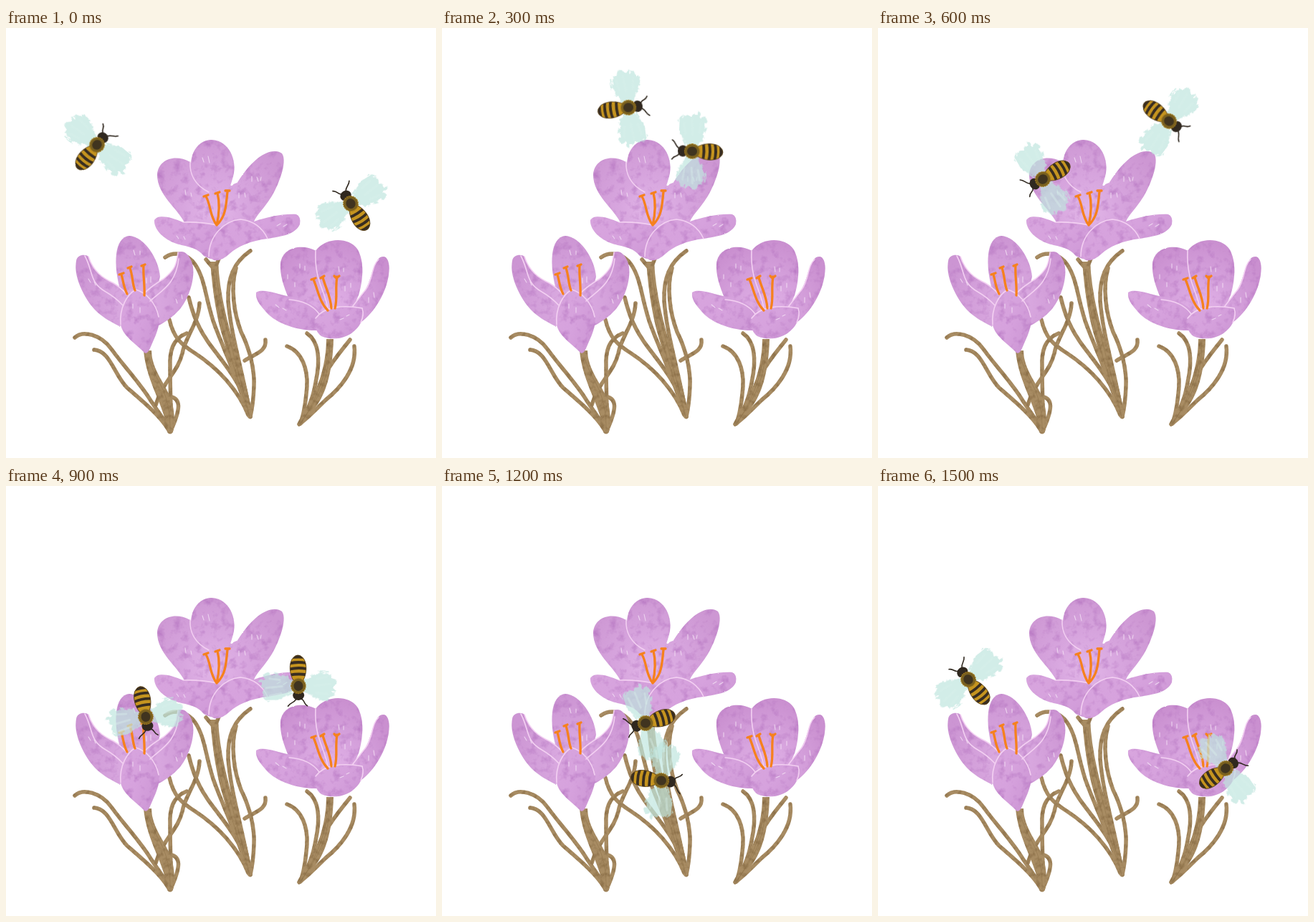
Recreate the animation shown at these times as an HTML page. Size 600 px wide and 600 px high, loop 1800 ms.

```html
<!DOCTYPE html>
<html lang="en">
<head>
<meta charset="utf-8">
<title>Bees over crocuses</title>
<style>
  html, body { margin: 0; width: 100%; height: 100%; overflow: hidden; background: #fff; }
  svg { display: block; width: 100vw; height: 100vh; }
  .leaves path { fill: none; stroke: #a88c63; stroke-width: 5.5; stroke-linecap: round; }
  .leaves .stem { fill: #a88c63; stroke: none; }
  .leaves .thin { stroke: #8c7147; stroke-width: 1; opacity: .5; }
  .veins { fill: none; stroke: #f3d0f2; stroke-width: 1.6; stroke-linecap: round; }
  .ticks { fill: none; stroke: #f2dff4; stroke-width: 1.1; stroke-linecap: round; opacity: .85; }
  .stamens { fill: none; stroke: #f6811d; stroke-width: 3.3; stroke-linecap: round; stroke-linejoin: round; }
</style>
</head>
<body>
<svg viewBox="0 0 600 600" xmlns="http://www.w3.org/2000/svg">
  <defs>
    <filter id="petalPaint" x="-5%" y="-5%" width="110%" height="110%" color-interpolation-filters="sRGB">
      <feTurbulence type="fractalNoise" baseFrequency=".09" numOctaves="4" seed="4" result="noise"/>
      <feColorMatrix in="noise" values="0 0 0 0 .69  0 0 0 0 .43  0 0 0 0 .74  1.5 0 0 0 -.75" result="spots"/>
      <feDisplacementMap in="SourceGraphic" in2="noise" scale="1.5" xChannelSelector="R" yChannelSelector="G" result="shape"/>
      <feComposite in="spots" in2="shape" operator="in" result="clipped"/>
      <feMerge><feMergeNode in="shape"/><feMergeNode in="clipped"/></feMerge>
    </filter>
    <filter id="leafPaint" x="-5%" y="-5%" width="110%" height="110%" color-interpolation-filters="sRGB">
      <feTurbulence type="fractalNoise" baseFrequency=".15" numOctaves="3" seed="9" result="noise"/>
      <feColorMatrix in="noise" values="0 0 0 0 .48  0 0 0 0 .37  0 0 0 0 .22  1.4 0 0 0 -.6" result="spots"/>
      <feDisplacementMap in="SourceGraphic" in2="noise" scale="1.2" xChannelSelector="R" yChannelSelector="G" result="shape"/>
      <feComposite in="spots" in2="shape" operator="in" result="clipped"/>
      <feMerge><feMergeNode in="shape"/><feMergeNode in="clipped"/></feMerge>
    </filter>
    <filter id="brush" x="-20%" y="-20%" width="140%" height="140%" color-interpolation-filters="sRGB">
      <feTurbulence type="fractalNoise" baseFrequency=".1 .22" numOctaves="3" seed="2"/>
      <feDisplacementMap in="SourceGraphic" scale="12" xChannelSelector="R" yChannelSelector="G"/>
    </filter>
    <radialGradient id="backA" gradientUnits="userSpaceOnUse" cx="292" cy="255" r="105">
      <stop offset="0" stop-color="#e2b6e8"/><stop offset=".45" stop-color="#d7a5de"/><stop offset="1" stop-color="#cd97d3"/>
    </radialGradient>
    <radialGradient id="backB" gradientUnits="userSpaceOnUse" cx="184" cy="385" r="95">
      <stop offset="0" stop-color="#deb0e4"/><stop offset=".5" stop-color="#d4a1db"/><stop offset="1" stop-color="#cc95d3"/>
    </radialGradient>
    <radialGradient id="backC" gradientUnits="userSpaceOnUse" cx="452" cy="390" r="92">
      <stop offset="0" stop-color="#e2b3e8"/><stop offset=".5" stop-color="#d5a1dc"/><stop offset="1" stop-color="#ca90d0"/>
    </radialGradient>
    <linearGradient id="front" x1="0" y1="0" x2="1" y2=".6">
      <stop offset="0" stop-color="#d8a5de"/><stop offset=".55" stop-color="#d6a2dd"/><stop offset="1" stop-color="#ce98d6"/>
    </linearGradient>

    <path id="wing" d="M5,-7 L17,-14 L27,-19 L43,-20 L51,-14 L49,-4 L53,5 L46,16 L31,19 L18,16 L8,8Z"/>
    <clipPath id="abdomenClip"><path id="abdomen" d="M-7,8 C-12,17 -13,30 -8,38 Q0,48 8,38 C13,30 12,17 7,8Z"/></clipPath>
    <g id="bee">
      <g filter="url(#brush)" fill="#bfe5de" opacity=".7">
        <use href="#wing"/><use href="#wing" transform="scale(-1,1)"/>
      </g>
      <path d="M24,-10 L40,-13 M23,0 L45,-2 M26,9 L40,11 M-24,-10 L-40,-12 M-23,0 L-45,2 M-26,9 L-40,12"
            fill="none" stroke="#d9f1ec" stroke-width="3" stroke-linecap="round" opacity=".35"/>
      <use href="#abdomen" fill="#c5941f"/>
      <g clip-path="url(#abdomenClip)" fill="none" stroke="#382d21" stroke-width="3.8">
        <path d="M-14,15 Q0,18 14,15 M-14,23 Q0,27 14,23 M-14,31 Q0,35 14,31"/>
        <path d="M-14,40 Q0,43 14,40" stroke-width="6"/>
      </g>
      <use href="#abdomen" fill="none" stroke="#5a431d" stroke-width=".9"/>
      <path d="M-3,-18 C-9,-19 -6,-25 -12,-28 M3,-18 C8,-25 11,-22 15,-28" fill="none" stroke="#30281f" stroke-width="1.6" stroke-linecap="round"/>
      <ellipse cy="-13" rx="8" ry="7" fill="#30281f"/>
      <ellipse rx="10.2" ry="10.5" fill="#79601f" stroke="#a37a1c" stroke-width="1.3" stroke-dasharray="2 1"/>
      <ellipse rx="6.5" ry="7" fill="#40341f"/>
    </g>
  </defs>

  <g class="leaves" filter="url(#leafPaint)">
    <path d="M222,320 C234,312 252,313 264,330 C279,352 279,384 292,417 C304,448 324,492 338,538"/>
    <path d="M255,376 C261,401 269,421 287,445 C308,472 329,499 339,532"/>
    <path d="M228,407 C234,433 245,442 264,454 C296,475 324,505 338,540"/>
    <path d="M341,311 C317,327 309,350 310,380 C313,425 328,470 340,535"/>
    <path d="M321,335 C313,362 318,398 328,424 C341,450 347,478 346,500 Q345,525 341,542"/>
    <path d="M362,435 C364,451 349,454 333,464"/>
    <path d="M279,323 L290,336 M297,322 L291,336"/>
    <path class="stem" d="M285,326 L296,326 C298,370 309,412 321,452 C333,488 340,515 344,543 Q341,548 337,543 C328,505 312,470 304,437 C293,402 288,365 285,326Z"/>
    <path class="thin" d="M293,340 C299,400 321,460 340,543 M289,340 C295,410 316,465 336,530"/>

    <path d="M96,432 C107,421 133,428 147,448 C166,474 186,494 202,520 C213,537 224,550 228,562"/>
    <path d="M123,449 C145,450 151,484 169,502 C192,522 214,540 227,561"/>
    <path d="M270,384 C269,412 249,433 246,454 C240,480 218,494 209,526"/>
    <path d="M252,426 C232,434 228,451 229,474 C229,502 230,530 231,560"/>
    <path d="M224,514 C247,514 243,533 230,562"/>
    <path class="stem" d="M192,450 L203,450 C203,477 224,498 231,520 C236,536 235,552 233,564 Q229,569 225,564 C223,530 196,496 192,450Z"/>
    <path class="thin" d="M200,463 C209,495 230,505 229,562"/>

    <path d="M420,426 C440,440 437,472 432,495 C428,520 419,536 411,551"/>
    <path d="M392,444 C414,452 421,477 420,500 C418,525 416,538 411,551"/>
    <path d="M480,435 C463,456 449,474 439,495 C430,517 422,540 411,552"/>
    <path d="M486,444 C490,476 466,503 446,519 C431,534 420,545 409,553"/>
    <path class="stem" d="M447,434 L457,434 C456,475 448,503 438,520 C428,537 417,548 408,556 Q405,553 409,547 C424,527 447,484 447,434Z"/>
    <path class="thin" d="M452,440 C450,492 438,513 411,552 M449,450 C446,491 429,525 412,550"/>
  </g>

  <g filter="url(#petalPaint)">
    <g fill="url(#backA)">
      <path d="M250,273 C239,251 211,233 211,205 C212,183 236,175 257,187 L300,245 L295,280Z"/>
      <path d="M319,222 C348,172 374,167 385,175 C394,187 378,224 370,236 C360,252 351,259 346,270 L295,285 L290,235Z"/>
      <path d="M262,210 C251,184 264,156 287,156 C311,157 323,184 317,207 C314,218 311,227 304,238 L290,240Z"/>
      <path d="M248,268 L300,225 L322,216 L346,270 L295,290Z"/>
    </g>
    <path fill="url(#front)" d="M207,268 C212,259 231,264 247,271 Q272,270 294,275 L315,290 L297,323 Q286,324 276,318 C266,305 250,305 238,301 C220,295 206,281 207,268Z"/>
    <path fill="url(#front)" d="M283,319 C283,289 305,269 327,267 Q339,267 346,270 C365,264 385,259 405,260 Q412,263 410,274 C404,288 384,291 365,294 C340,297 323,305 312,315 Q300,326 290,324Z"/>

    <path fill="url(#backB)" d="M160,368 C149,330 151,292 172,290 C193,291 213,322 215,347 L205,385 L175,390Z"/>
    <path fill="url(#backB)" d="M98,325 C99,316 111,315 115,319 C122,340 135,349 150,356 Q165,364 176,378 L176,410 L158,416 C134,404 121,394 109,372 C98,351 96,337 98,325Z"/>
    <path fill="url(#backB)" d="M240,313 C249,309 257,318 260,329 C265,347 256,376 243,392 Q229,408 207,418 L184,382 C198,363 211,357 220,350 C236,337 238,330 240,313Z"/>
    <path fill="url(#front)" d="M181,365 C169,372 158,390 160,414 C163,430 181,440 193,453 Q197,456 201,447 C209,428 215,418 213,403 C209,383 195,369 181,365Z"/>

    <path fill="url(#backC)" d="M433,311 C412,300 386,306 383,328 C382,346 387,359 395,379 L450,400 L453,360Z"/>
    <path fill="url(#backC)" d="M432,311 C445,292 478,291 490,308 C501,325 498,354 492,373 L481,398 L449,400 C446,367 430,353 432,311Z"/>
    <path fill="url(#backC)" d="M522,320 C534,315 536,331 534,344 C531,369 514,397 496,410 L470,397 C486,382 497,376 502,364 C511,349 511,329 522,320Z"/>
    <path fill="url(#front)" d="M349,369 C359,362 384,374 407,377 Q425,382 440,395 L460,420 L436,422 C403,423 373,410 361,394 C353,385 348,378 349,369Z"/>
    <path fill="url(#front)" d="M432,405 C443,389 470,386 497,391 C500,407 494,417 482,426 C469,435 452,435 440,430 Q429,422 432,405Z"/>
  </g>

  <g class="veins">
    <path d="M257,187 C256,203 263,219 283,229 M247,271 Q270,270 294,275 M283,319 C283,289 305,269 327,267 Q354,270 365,294"/>
    <path d="M110,318 C122,340 116,355 139,368 Q153,376 163,387 M115,319 C122,340 135,349 150,356 Q160,362 169,372 M181,365 C169,372 158,390 160,414 M181,365 C195,369 209,383 213,403 M240,313 C238,330 236,337 220,350 Q203,360 192,371 M241,322 C237,358 217,366 201,381"/>
    <path d="M432,311 C430,353 446,367 449,392 M395,379 Q424,381 437,399 M432,405 C443,389 470,386 497,391 Q500,400 495,411 M520,323 C510,331 512,352 502,365 Q494,375 484,388"/>
  </g>
  <path class="ticks" d="M274,181 l2,6 M282,179 l2,9 M343,207 v7 M350,208 l2,6 M356,208 l-1,5 M250,226 l1,7 M258,230 l1,5 M325,230 v7 M333,230 l1,6 M238,290 l3,4 M248,291 l2,4 M378,276 l5,-3 M387,277 l5,-3
    M178,310 l2,7 M187,311 v5 M196,349 v7 M202,347 v8 M115,350 l3,5 M123,354 l2,5 M237,378 l2,6 M245,372 l1,6 M177,385 v6 M187,390 v7
    M410,329 v6 M417,332 v6 M464,333 l1,7 M471,335 v5 M393,344 v6 M403,355 v6 M473,360 v7 M481,356 v6 M376,386 l5,4 M386,391 l5,3 M506,376 v7 M513,369 l1,7 M466,407 l5,-2 M475,402 l4,-2"/>
  <g class="stamens">
    <path d="M279,235 C286,247 284,262 294,275 M295,230 C299,246 297,262 294,275 M309,228 C307,250 306,264 294,275 M276,235 L282,233 M292,231 L298,229 M306,227 L312,227"/>
    <path d="M161,344 C164,354 164,362 169,371 M173,335 C177,346 176,356 180,366 M192,331 C191,345 194,360 193,373 M158,344 L164,342 M170,335 L175,333 M189,332 L194,330"/>
    <path d="M429,351 C435,364 437,382 449,394 M442,348 C446,363 453,374 454,391 M462,347 C459,363 463,377 459,391 M426,351 L432,349 M439,349 L444,346 M458,346 L461,349 L465,346"/>
  </g>

  <use id="left" href="#bee"/>
  <use id="right" href="#bee"/>
</svg>
<script>
  const STEP = 300;
  // Each stop: thorax x, thorax y, heading in degrees clockwise from up.
  const flights = {
    left: [[127, 163, 39], [260, 111, 82], [230, 211, -120], [195, 322, 169], [284, 331, -107], [126, 270, -39]],
    right: [[481, 245, -32], [349, 172, -88], [406, 130, 126], [408, 279, 179], [306, 411, 97], [485, 394, 55]]
  };

  function render(time) {
    for (const [id, stops] of Object.entries(flights)) {
      const [x, y, heading] = stops[Math.floor(time / STEP) % stops.length];
      document.getElementById(id).setAttribute("transform", `translate(${x} ${y}) rotate(${heading})`);
    }
  }

  const start = performance.now();
  function tick() {
    render(performance.now() - start);
    requestAnimationFrame(tick);
  }
  tick();
</script>
</body>
</html>
```
